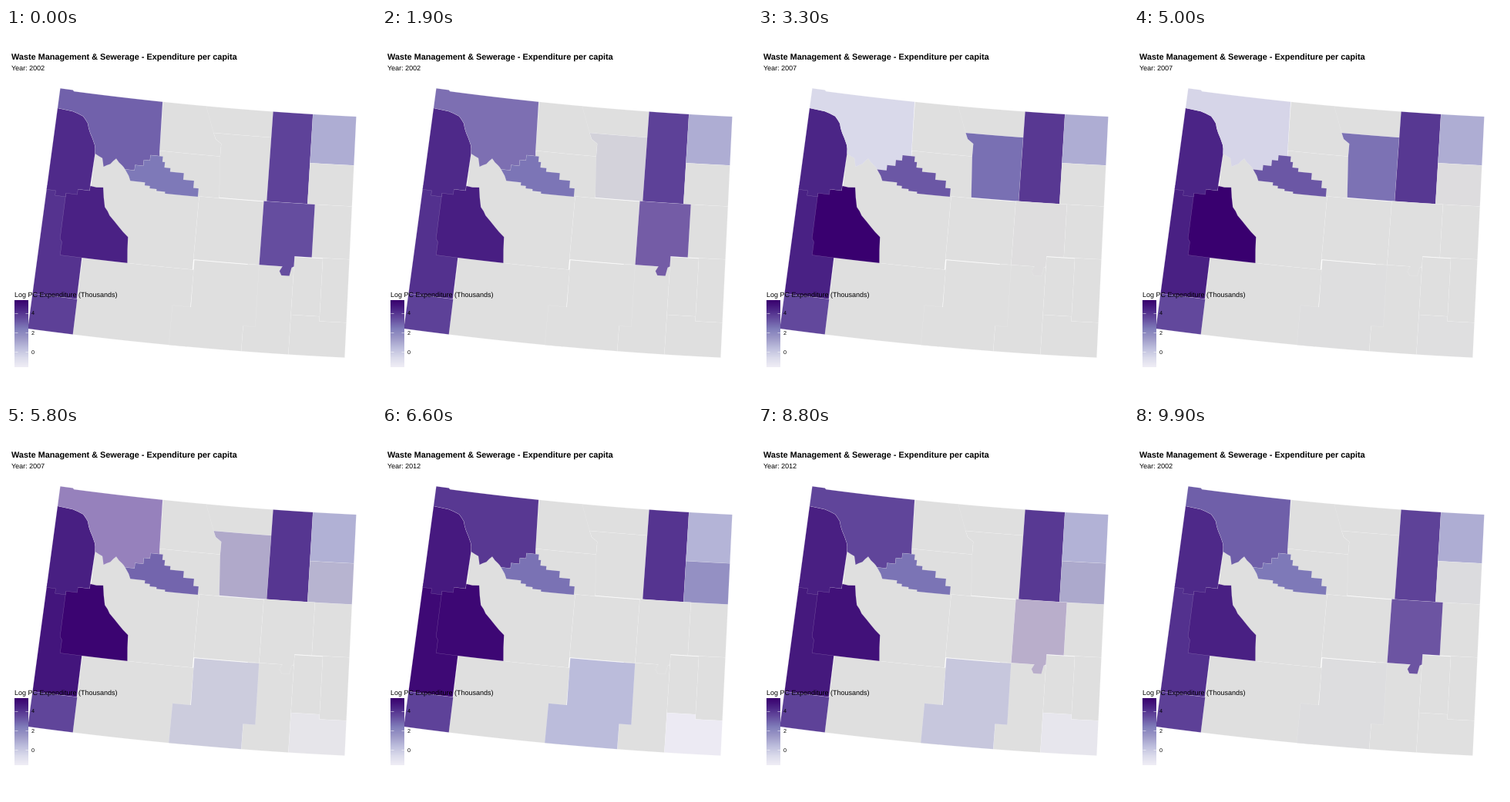
Animation of 480x480 px, one loop 10 s. Source, as a matplotlib script:

```python
import numpy as np
import matplotlib.pyplot as plt
from matplotlib.animation import FuncAnimation
from matplotlib.colors import LinearSegmentedColormap, to_rgb
from matplotlib.patches import Polygon

SIZE, DPI = 480, 80
FRAMES, INTERVAL = 100, 100
PT = 72 / DPI
GREY = "#dfdfdf"
LOW, HIGH = -1.58, 5.27
plt.rcParams["font.family"] = "Liberation Sans"
plt.rcParams["text.hinting"] = "none"

ramp = LinearSegmentedColormap.from_list("ramp", [
    "#efedf5", "#dadaeb", "#bcbddc", "#9e9ac8", "#807dba", "#6750a1", "#4c2687", "#39006f"])


# Map coordinates are degrees east and south of the north-west corner.
def project(points):
    """Conic projection of a closed outline to stage pixels."""
    p = np.array(points, float)
    t = np.linspace(0, 1, 6, endpoint=False)[:, None, None]
    east, south = (p + (np.roll(p, -1, axis=0) - p) * t).transpose(1, 0, 2).reshape(-1, 2).T
    theta = np.radians(7.7 - 4.95 * east / 7)
    rho = 4467 + 78.25 * south
    return np.column_stack([668.7 - rho * np.sin(theta), rho * np.cos(theta) - 4346.9])


def box(west, north, east, south):
    return [(west, north), (east, north), (east, south), (west, south)]


def stair(start, *corners):
    """Go east, then north or south, to each corner in turn."""
    path = [start]
    for east, south in corners:
        path += [(east, path[-1][1]), (east, south)]
    return path


def rough(keys, seed, amount=.012):
    """A natural border: key points with small random bends between them."""
    rng = np.random.default_rng(seed)
    path = []
    for a, b in zip(keys, keys[1:]):
        mid = (np.add(a, b) / 2 + rng.uniform(-amount, amount, 2)).tolist()
        path += [a, tuple(mid)]
    return path + [keys[-1]]


teton_east = rough([(.36, .33), (.62, .39), (.75, .5), (.83, .65), (.97, .84), (1, .98)], 3)
teton_south = stair((0, 1.67), (.21, 1.75), (.45, 1.69), (.71, 1.6), (.98, 1.52))
park_south = rough([(1, .98), (1.18, 1.04), (1.23, 1.18), (1.38, 1.12), (1.5, 1.02),
                    (1.65, 1.12), (1.73, 1.18)], 5, .006)
sublette_east = rough([(.98, 1.52), (1.28, 1.52), (1.37, 1.84), (1.5, 1.97), (1.74, 2.14),
                       (1.97, 2.29), (2.02, 2.72)], 8)
springs_north = stair((1.73, 1.18), (1.95, 1.09), (2.14, .99), (2.28, .9), (2.49, .9))
springs_east = stair((2.49, .9), (2.57, .99), (2.63, 1.08), (2.77, 1.14), (3.09, 1.25),
                     (3.34, 1.37), (3.46, 1.51))
springs_south = [(1.73, 1.18), (1.83, 1.28)] + stair((1.88, 1.36), (2.22, 1.41),
                                                     (2.34, 1.45), (2.5, 1.48), (2.7, 1.51))
horn_east = [(3.69, .43), (3.75, .53), (3.89, .6), (3.89, .81)]

# Painted in order: later counties cover the rough side of earlier ones
COUNTIES = {
    "fremont": box(1, .9, 3.49, 2.72),
    "sweetwater": box(1, 2.72, 3.52, 4),
    "natrona": box(3.49, 1.5, 4.975, 2.55),
    "albany": box(4.72, 2.55, 5.76, 4),
    "platte": box(5.76, 2.38, 6.4, 3.34),
    "goshen": box(6.4, 2.37, 7, 3.42),
    "niobrara": box(6.15, 1.49, 7, 2.37),
    "sheridan": box(3.4, 0, 5.04, .43),
    "washakie": box(2.49, .81, 3.95, 1.5),
    "big horn": [(2.44, 0), (3.46, 0), *horn_east, (2.48, .81)],
    "johnson": [*horn_east, (3.95, 1.49), (5.04, 1.49), (5.04, .43)],
    "campbell": box(5.04, 0, 5.98, 1.49),
    "crook": box(5.98, 0, 7, .81),
    "weston": box(5.98, .81, 7, 1.49),
    "converse": [(4.975, 1.49), (6.15, 1.49), (6.15, 2.37), (5.76, 2.37), (5.76, 2.54),
                 (5.71, 2.56), (5.67, 2.7), (5.49, 2.7), (5.44, 2.63), (5.5, 2.55),
                 (4.975, 2.55)],
    "carbon": [(3.51, 2.56), (4.975, 2.56), (4.99, 3.58), (4.72, 3.58), (4.72, 4),
               (3.12, 4), (3.12, 3.34), (3.53, 3.34)],
    "laramie": stair((5.76, 3.34), (6.4, 3.42), (7, 4)) + [(5.76, 4)],
    "lincoln": box(0, 1.6, .99, 3.41),
    "uinta": box(0, 3.41, 1, 4),
    "sublette": [(.45, 1.69), *teton_south[6:], *sublette_east, (.5, 2.72), (.5, 2.5),
                 (.45, 2.45)],
    "teton": [(0, .31), *teton_east, *teton_south[::-1]],
    "park": [(0, -.02), (.3, -.02), (.33, 0), (2.43, 0), (2.48, .82), *springs_north[::-1],
             *park_south[::-1], *teton_east[::-1], (0, .31)],
    "springs": [*springs_north, *springs_east, *springs_south[::-1]],
}

# Log spending in 2002, 2007 and 2012; None where nothing was reported
SPENDING = {
    "park": (2.93, -.6, 3.87),
    "teton": (4.18, 4.32, 4.62),
    "lincoln": (3.97, 4.42, 5.02),
    "uinta": (3.67, 3.48, 3.62),
    "sublette": (4.39, 5.27, 5.07),
    "springs": (2.42, 3.16, 2.58),
    "johnson": (None, 2.63, None),
    "campbell": (3.62, 3.87, 3.94),
    "crook": (.83, .83, .63),
    "weston": (None, None, 1.69),
    "converse": (3.38, None, None),
    "carbon": (None, None, .41),
    "laramie": (None, None, -1.4),
}

XYZ = np.array([[.4124, .3576, .1805], [.2126, .7152, .0722], [.0193, .1192, .9505]])
WHITE = XYZ.sum(axis=1)


def to_lab(color):
    c = np.array(to_rgb(color))
    lin = np.where(c > .04045, ((c + .055) / 1.055) ** 2.4, c / 12.92)
    t = XYZ @ lin / WHITE
    x, y, z = np.where(t > .008856, np.cbrt(t), 7.787 * t + 16 / 116)
    return np.array([116 * y - 16, 500 * (x - y), 200 * (y - z)])


def from_lab(lab):
    y = (lab[0] + 16) / 116
    f = np.array([y + lab[1] / 500, y, y - lab[2] / 200])
    t = np.where(f > .2069, f ** 3, (f - 16 / 116) / 7.787)
    lin = np.clip(np.linalg.solve(XYZ, t * WHITE), 0, 1)
    return np.clip(np.where(lin > .0031308, 1.055 * lin ** (1 / 2.4) - .055, lin * 12.92), 0, 1)


def fill(value):
    return GREY if value is None else ramp((value - LOW) / (HIGH - LOW))


labs = {name: [to_lab(fill(v)) for v in values] for name, values in SPENDING.items()}

fig = plt.figure(figsize=(SIZE / DPI, SIZE / DPI), dpi=DPI, facecolor="white")
ax = fig.add_axes([0, 0, 1, 1])
ax.axis("off")

shapes = {name: ax.add_patch(Polygon(project(points), fc=GREY, ec=(1, 1, 1, .3), lw=.4 * PT))
          for name, points in COUNTIES.items()}


def label(x, y, text, px, **kw):
    return ax.text(x, y, text, fontsize=px * PT, color="black", zorder=5, **kw)


label(6.9, 42, "Waste Management & Sewerage - Expenditure per capita", 10.83, weight="bold")
year = label(6.9, 55, "", 9)
label(11.4, 349, "Log PC Expenditure (Thousands)", 9)

top, bottom = 353.5, 440
ax.imshow(np.linspace(1, 0, 256)[:, None], cmap=ramp, extent=(11, 28.5, bottom, top),
          aspect="auto", zorder=3)
for value in (0, 2, 4):
    y = bottom + (top - bottom) * (value - LOW) / (HIGH - LOW)
    for x in (11, 25):
        ax.plot([x, x + 3.5], [y, y], color="white", lw=.5 * PT, zorder=4,
                solid_capstyle="butt")
    label(32.7, y + 2.8, str(value), 7.2)

ax.set_xlim(0, SIZE)
ax.set_ylim(SIZE, 0)


def update(frame):
    # Each third of the loop: hold, then fade to the next year on every second frame
    third = FRAMES / 3
    i = int(frame / third)
    since = frame // 2 * 2 - (i + .5) * third
    p = np.clip((since + .5) / 16, 0, 1)
    for name, lab in labs.items():
        a, b = lab[i], lab[(i + 1) % 3]
        shapes[name].set_facecolor(from_lab(a + (b - a) * p))
    year.set_text(f"Year: {2002 + 5 * ((frame + 8) * 3 // FRAMES % 3)}")
    return [*shapes.values(), year]


anim = FuncAnimation(fig, update, frames=FRAMES, interval=INTERVAL, repeat=True,
                     repeat_delay=0, blit=False)
plt.show()
```
